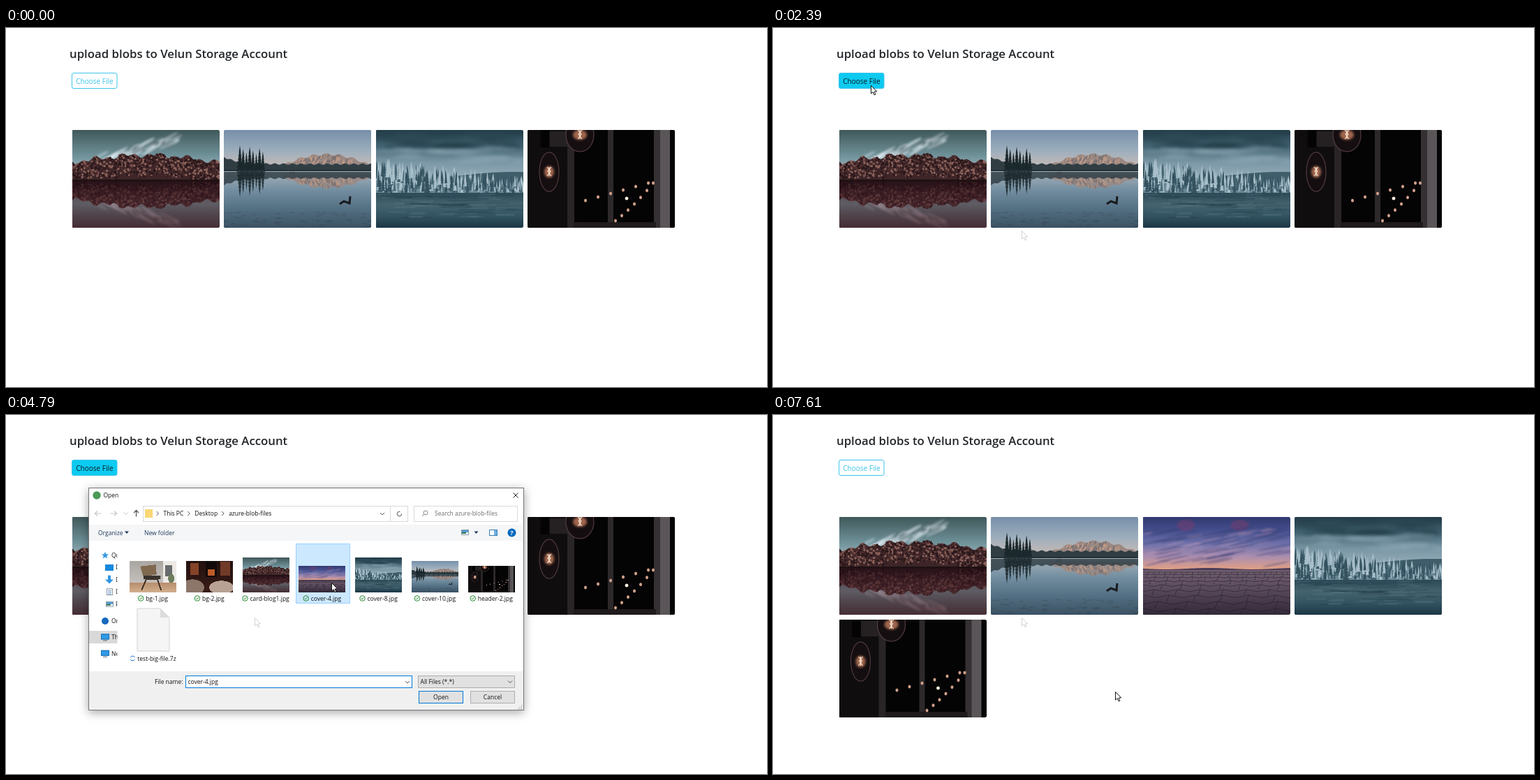
An HTML page with a canvas that plays this animation: 1090 by 514 pixels, repeating every 8 s.

```html
<!DOCTYPE html>
<html lang="en">
<head>
<meta charset="utf-8">
<title>Blob upload</title>
<style>
  html, body { margin: 0; width: 100%; height: 100%; overflow: hidden; background: #fff; }
  canvas { display: block; }
</style>
</head>
<body>
<canvas id="stage" width="1090" height="514"></canvas>
<script>
const W = 1090, H = 514, LOOP = 8000, PW = 211, PH = 140;
let c = document.getElementById('stage').getContext('2d'); // context the helpers draw on

// ---------- helpers ----------
const clamp = k => Math.max(0, Math.min(1, k));

function box(color, x, y, w, h, border, width = 1) {
  c.fillStyle = color;
  c.fillRect(x, y, w, h);
  if (!border) return;
  c.strokeStyle = border;
  c.lineWidth = width;
  c.strokeRect(x + width / 2, y + width / 2, w - width, h - width);
}
function trace(points) {
  c.beginPath();
  for (let i = 0; i < points.length; i += 2) c.lineTo(points[i], points[i + 1]);
}
function poly(color, ...points) {
  trace(points);
  c.fillStyle = color;
  c.fill();
}
function outline(color, width = 1) {
  c.strokeStyle = color;
  c.lineWidth = width;
  c.stroke();
}
function line(color, width, ...points) {
  trace(points);
  outline(color, width);
}
function oval(color, x, y, rx, ry = rx, turn = 0) {
  c.beginPath();
  c.ellipse(x, y, rx, ry, turn, 0, 7);
  c.fillStyle = color;
  c.fill();
}
function arc(color, x, y, r, from = 0, to = 7) {
  c.beginPath();
  c.arc(x, y, r, from, to);
  outline(color);
}
function text(str, x, y, { size = 8.5, color = '#111', weight = 400, align = 'left' } = {}) {
  c.font = `${weight} ${size}px "Open Sans", "Noto Sans", sans-serif`;
  c.textAlign = align;
  c.fillStyle = color;
  c.fillText(str, x, y + size * 0.36);
}
function fade(y0, y1, ...colors) {
  const g = c.createLinearGradient(0, y0, 0, y1);
  colors.forEach((color, i) => g.addColorStop(i / (colors.length - 1), color));
  box(g, 0, y0, PW, y1 - y0);
}
function scatter(n, seed, draw) {
  const random = () => (seed = (seed * 16807) % 2147483647) / 2147483647;
  for (let i = 0; i < 10; i++) random();
  for (let i = 0; i < n; i++) draw(random(), random(), random());
}
function isolated(draw) {
  c.save();
  draw();
  c.restore();
}
const blurred = (px, draw) => isolated(() => { c.filter = `blur(${px}px)`; draw(); });

// Fills from a skyline top(x) down to the base.
function ridge(color, base, top, x0 = 0, x1 = PW) {
  c.fillStyle = color;
  for (let x = x0; x < x1; x++) c.fillRect(x, top(x), 1.5, base - top(x));
}
function mirrored(y, alpha, draw) {
  isolated(() => {
    c.beginPath();
    c.rect(0, y, PW, PH - y);
    c.clip();
    c.translate(0, y * 2);
    c.scale(1, -1);
    c.globalAlpha = alpha;
    draw();
  });
}
function pine(color, x, base, h) {
  for (let i = 0; i < 6; i++) {
    const top = base - h + i * h * 0.14, half = h * (0.04 + i * 0.018);
    poly(color, x, top, x + half, top + h * 0.28, x - half, top + h * 0.28);
  }
}
const pick = (list, k) => list[Math.floor(k * list.length)];

function canvas(w, h, scale, draw) {
  const el = document.createElement('canvas'), before = c;
  el.width = w * scale;
  el.height = h * scale;
  c = el.getContext('2d');
  c.scale(scale, scale);
  draw();
  c = before;
  return el;
}

// ---------- pictures ----------
function redLake() {
  const sky = () => {
    fade(0, 72, '#40585a', '#6f9199', '#b4cad0');
    blurred(3, () => scatter(60, 11, (a, b, s) =>
      oval(s > 0.3 ? 'rgba(232,243,250,.4)' : 'rgba(58,82,86,.6)', 40 + a * 105, 36 - a * 28 + b * 14, 4 + s * 13, 2, -0.5)));
  };
  const wood = () => {
    const top = x => 47 - 11 * Math.sin(Math.PI * x / PW) + 2 * Math.sin(x / 3) + 2 * Math.sin(x / 7);
    ridge('#3d2528', 73, top);
    scatter(1100, 5, (a, b, s) =>
      oval(pick(['#6e4442', '#50302f', '#8d645c', '#2c191c'], s), a * PW, top(a * PW) + b * 29, 0.7 + s * 1.2));
  };
  sky();
  wood();
  mirrored(73, 1, sky);
  mirrored(73, 0.9, wood);
  fade(73, PH, 'rgba(30,8,16,.75)', 'rgba(72,34,42,.5)', 'rgba(70,30,38,.75)');
  box('#1f1114', 0, 71, PW, 3);
}

function calmLake() {
  const shore = () => {
    const rock = x => 52 - 17 * Math.sin(Math.PI * clamp((x - 84) / 125)) ** 0.8 + 1.5 * Math.sin(x / 3);
    ridge('#9b8882', 54, rock, 84, 209);
    scatter(90, 21, (a, b, s) => oval(pick(['#c09b87', '#7a7172'], s), 95 + a * 90, rock(95 + a * 90) + 2 + b * 10, 1, 3, 0.4));
    ridge('#303e44', 58, x => 49 - 10 * Math.exp(-x / 20) + Math.sin(x / 2));
    for (let i = 0; i < 8; i++) pine('#1b292d', 23 + i * 4.7, 60, 38 - (i * 5) % 13);
  };
  fade(0, 58, '#7790a9', '#9caebd', '#d0bfb5');
  shore();
  fade(58, PH, '#a9b4bd', '#748fa1', '#547084', '#3b5263');
  mirrored(59, 0.72, shore);
  box('#222f34', 0, 57, PW, 2);
  scatter(60, 4, (a, b, s) => oval('rgba(45,58,64,.25)', a * PW, 118 + b * 22, 2 + s * 4, 0.8));
  line('#17191c', 3, 166, 106, 172, 102, 180, 105, 181, 95);
}

function frost() {
  fade(0, 70, '#243e4a', '#446473', '#7b98a6', '#98afbb');
  blurred(5, () => scatter(40, 9, (a, b, s) =>
    oval(b > 0.5 ? 'rgba(150,177,190,.3)' : 'rgba(30,56,68,.3)', a * PW, 4 + b * 42, 10 + s * 30, 3)));
  ridge('#3f5d6a', 91, x => 67 - 7 * Math.sin((x - 105) / 60), 105);
  ridge('#698795', 91, x => 64 + x * 0.09);
  scatter(380, 17, (a, b, s) => {
    const depth = 10 + 16 * (1 - a);
    pine(pick(['#2b4856', '#93afbc', '#466673', '#355360', '#a9c0cb'], s), a * PW, 91 - depth * (1 - b), 8 + depth * s * 0.9);
  });
  pine('#36525e', 74, 91, 34);
  fade(90, PH, '#2c4a57', '#45646f', '#335361', '#1c3745');
  blurred(1, () => scatter(60, 3, (a, b, s) =>
    box(pick(['rgba(130,162,176,.2)', 'rgba(20,44,56,.25)'], s), a * 180, 91 + b * 34, 15 + s * 30, 1.5)));
}

function bulb(x, y, rx, ry) {
  oval('#150e10', x, y, rx, ry);
  outline('#5b4346');
  blurred(3, () => oval('#a0664e', x, y, rx * 0.5, ry * 0.3));
  for (let i = -1; i < 2; i++) line('#ffe9d4', 1, x + i * 3, y + 6, x - i * 2, y - 1, x + i * 3, y - 7);
}
function bulbs() {
  const bar = (color, x, w) => box(color, x, 0, w, PH);
  bar('#050405', 0, PW);
  bar('#100d0f', 0, 57);
  box('#252123', 28, 2, 30, 22);
  bar('#292527', 57, 10);
  bar('#2d292b', 115, 8);
  bar('#353133', 181, 9);
  bar('#5a5558', 190, 14);
  box('#1f1b1d', 66, 132, 118, 8);
  line('#050405', 13, 25, 0, 25, 25);
  bulb(31, 60, 14, 28);
  bulb(75, 7, 20, 24);
  const light = (x, y) => oval('#d0a08a', x, y, 2, 2.4);
  for (let i = 0; i < 7; i++) light(126 + 9 * i, 130 - 7 * i - i * i / 3);
  for (let i = 0; i < 6; i++) light(83 + 18 * i, 101 - 5 * i);
  oval('#fff0df', 142, 98, 2.4);
}

function desert() {
  fade(0, 75, '#32396f', '#454f8d', '#6d70a9', '#a98db0', '#e2a084');
  blurred(2, () => {
    [62, 139].forEach(x => oval('rgba(112,62,112,.6)', x, 12, 13, 8));
    scatter(75, 31, (a, b, s) => oval(pick(['rgba(205,160,185,.3)', 'rgba(52,58,112,.35)'], s), a * PW, 18 + b * 50, 8 + s * 18, 1.4, -0.2));
  });
  ridge('#4a3c58', 77, x => 74 + Math.sin(x / 20));
  fade(76, PH, '#71606f', '#5f4f61', '#493c4d', '#332a39');
  for (let row = 0, y = 79; y < PH; row++, y += 2 + row) {
    const pitch = 8 + row * 5;
    for (let x = -(row % 2) * pitch / 2; x < PW; x += pitch)
      line('rgba(30,22,36,.6)', 0.8, x, y, x + pitch / 2, y + row * 0.6, x + pitch, y, x + pitch * 0.9, y + 3 + row);
  }
}

function armchair() {
  fade(0, 96, '#aaa6a2', '#c3bfbb');
  fade(96, PH, '#b78e6c', '#d2af8f');
  box('#ece9e5', 150, 0, 61, 96);
  box('#686b6c', 160, 20, 32, 48);
  poly('#80694f', 48, 24, 118, 16, 122, 60, 62, 70);
  box('#37332f', 62, 66, 78, 15);
  line('#3e3027', 6, 54, 130, 76, 80, 125, 80, 142, 130);
  oval('#6c7e5d', 188, 78, 14, 20);
}
function fireside() {
  fade(0, PH, '#22100f', '#3a1d17');
  box('#854328', 20, 8, 36, 54);
  box('#120a0a', 88, 0, 52, 72);
  box('#bb5c2a', 98, 38, 32, 26);
  box('#713b28', 155, 4, 45, 62);
  oval('#8c7569', 30, 118, 52, 36);
  oval('#b7a293', 160, 118, 55, 30);
}

const picture = paint => canvas(PW, PH, 2, () => {
  c.beginPath();
  c.roundRect(0, 0, PW, PH, 2);
  c.clip();
  paint();
});
const [RED, CALM, FROST, BULBS, DESERT, CHAIR, FIRE] =
  [redLake, calmLake, frost, bulbs, desert, armchair, fireside].map(picture);

// ---------- file dialog ----------
const BLUE = '#0078d7', GRAY = '#555', PALE = '#d9d9d9', NAVY = '#1e395b';
const FILES = [
  ['bg-1.jpg', CHAIR, 45], ['bg-2.jpg', FIRE, 45], ['card-blog1.jpg', RED, 50], ['cover-4.jpg', DESERT, 38],
  ['cover-8.jpg', FROST, 50], ['cover-10.jpg', CALM, 45], ['header-2.jpg', BULBS, 38],
];

function chevron(x, y, turn = 0, color = GRAY) {
  isolated(() => {
    c.translate(x, y);
    c.rotate(turn);
    line(color, 1, -3, -1.5, 0, 1.5, 3, -1.5);
  });
}
function arrow(x, y, turn, color) {
  isolated(() => {
    c.translate(x, y);
    c.rotate(turn);
    line(color, 1.1, -4.5, 0, 4.5, 0, 1, -3.5);
    line(color, 1.1, 4.5, 0, 1, 3.5);
  });
}
const caret = (x, y) => poly(NAVY, x - 3, y - 1.5, x + 3, y - 1.5, x, y + 2);

const icons = {
  star(x, y) {
    const points = [];
    for (let i = 0; i < 10; i++) {
      const r = i % 2 ? 2.3 : 5.5, a = i * Math.PI / 5 - Math.PI / 2;
      points.push(x + r * Math.cos(a), y + r * Math.sin(a));
    }
    poly('#3297e3', ...points);
  },
  desktop: (x, y) => box('#1588dc', x - 6, y - 4, 12, 9),
  download(x, y) {
    box('#3297e3', x - 2, y - 6, 4, 7);
    poly('#3297e3', x - 6, y, x + 6, y, x, y + 6);
  },
  sheet(x, y) {
    box('#fff', x - 4, y - 5, 9, 10, '#8b98a5');
    for (let i = 0; i < 3; i++) box('#5c8fc0', x - 2, y - 2.5 + i * 2.5, 5, 1);
  },
  landscape(x, y) {
    box('#fff', x - 5, y - 4, 11, 8, '#8d9aa6');
    box('#4f9bd0', x - 4, y - 3, 9, 3);
    box('#39704f', x - 4, y, 6, 2);
  },
  disc: (x, y) => oval('#1669bd', x, y, 5),
  screen(x, y) {
    box('#2f9be8', x - 6, y - 5, 12, 8, '#1a6fb5');
    box('#56687a', x - 3, y + 4, 6, 1);
  },
};

function sidebar() {
  isolated(() => {
    c.beginPath();
    c.rect(119, 181, 40.5, 186);
    c.clip();
    box(PALE, 119, 309, 41, 18);
    const row = (icon, name, x, y) => {
      icons[icon](x, y);
      text(name, x + 9, y);
    };
    row('star', 'Quick access', 142, 201);
    ['desktop Desktop', 'download Downloads', 'sheet Documents', 'landscape Pictures']
      .forEach((entry, i) => row(...entry.split(' '), 148, 218 + i * 17.6));
    [['disc', 'One'], ['screen', 'This PC'], ['screen', 'Network']]
      .forEach((entry, i) => row(...entry, 142, 295 + i * 23.4));
  });
}

function fileLabel(name, center, y, synced) {
  c.font = '8.5px "Open Sans", "Noto Sans", sans-serif';
  const x = center - c.measureText(name).width / 2 - 1.5;
  if (synced) {
    arc('#25872f', x, y, 3.8);
    line('#25872f', 1, x - 2, y, x - 0.5, y + 1.5, x + 2, y - 1.5);
  } else {
    arc('#1f78c8', x, y, 3.4, 0.4, 2.8);
    arc('#1f78c8', x, y, 3.4, 3.6, 5.9);
  }
  text(name, x + 7, y);
}

function addressBar() {
  arrow(132, 141, Math.PI, '#c5c5c5');
  arrow(154, 141, 0, '#c5c5c5');
  chevron(171.5, 141, 0, '#c5c5c5');
  arrow(186.5, 141, -Math.PI / 2, '#444');
  box('#fff', 196, 130, 380, 23, PALE);
  box(PALE, 550, 130, 1, 23);
  box('#f9d774', 199, 135, 11, 12);
  ['This PC', 'Desktop', 'azure-blob-files'].reduce((x, name) => {
    chevron(x, 141, -Math.PI / 2);
    text(name, x + 8.5, 141);
    return x + c.measureText(name).width + 16;
  }, 217);
  chevron(539, 141.5);
  arc(GRAY, 563.5, 141.5, 3.3, 0, 5);
  box('#fff', 584, 130, 149, 23, PALE);
  arc('#888', 601, 140, 3);
  line('#888', 1, 599, 142, 596, 145);
  text('Search azure-blob-files', 614, 141, { color: '#6d6d6d' });
}

function toolbar() {
  box('#f5f6f7', 119, 157, 622, 23);
  text('Organize', 132, 168.5, { color: NAVY });
  text('New folder', 198, 168.5, { color: NAVY });
  caret(173, 168);
  icons.landscape(657, 168);
  caret(673.5, 168);
  box('#fff', 692, 164, 12, 9, '#3b7fb5');
  box('#6fb2e2', 699, 165, 4, 7);
  oval('#0069bd', 724.5, 168.5, 6);
  text('?', 724.5, 168.5, { size: 9, color: '#fff', weight: 700, align: 'center' });
}

function fileList(picked, hovered) {
  if (picked) box('#cce8ff', 415, 184, 78, 86, '#99d1ff');
  else if (hovered) box('#e5f3ff', 415, 184, 78, 86);
  FILES.forEach(([name, photo, height], i) => {
    const center = 210.5 + i * 80.8;
    c.drawImage(photo, center - 33.5, 254 - height, 67, height);
    fileLabel(name, center, 262.5, true);
  });
  poly('#f5f5f5', 188, 277, 221, 277, 234, 290, 234, 338, 188, 338, 188, 277);
  outline('#d3d3d3');
  poly('#dcdcdc', 221, 277, 234, 290, 221, 290);
  fileLabel('test-big-file.7z', 210.5, 348.5, false);
}

function footer(detail, picked) {
  const field = (x, y, w, label, fill, border, align = 'left') => {
    if (!detail) return box('#fff', x, y, w, 18);
    box(fill, x, y, w, 18, border);
    text(label, align === 'left' ? x + 3.5 : x + w / 2, y + 9, { align });
  };
  box('#f0f0f0', 118, 367, 624, 56);
  field(257, 373, 325, picked ? 'cover-4.jpg' : '', '#fff', BLUE);
  field(590, 373, 139, 'All Files (*.*)', '#e1e1e1', '#adadad');
  field(591, 395, 64, 'Open', '#e1e1e1', BLUE, 'center');
  field(665, 395, 64, 'Cancel', '#e1e1e1', '#adadad', 'center');
  if (!detail) return box('#fff', 214, 377, 40, 11);
  text('File name:', 253.5, 382, { align: 'right' });
  chevron(575, 382.5);
  chevron(722, 382);
  for (let i = 0; i < 3; i++) for (let j = 0; j <= i; j++) box('#a5a5a5', 738 - j * 2.5, 415 + i * 2.5, 1.3, 1.3);
}

function dialog({ detail, picked, hovered }) {
  isolated(() => {
    c.shadowColor = 'rgba(0,0,0,.36)';
    c.shadowBlur = 13;
    c.shadowOffsetY = 3;
    box('#fff', 118, 104, 624, 319);
  });
  oval(detail ? '#4a9a55' : '#777', 130, 115, 5.7);
  text('Open', 139.5, 115);
  line('#222', 1, 726.5, 111.5, 733.5, 118.5);
  line('#222', 1, 733.5, 111.5, 726.5, 118.5);
  if (detail) {
    addressBar();
    toolbar();
    sidebar();
    fileList(picked, hovered);
  }
  footer(detail, picked);
  c.strokeStyle = '#777';
  c.strokeRect(118.5, 104.5, 623, 318);
}
const layer = state => canvas(W, H, 1, () => dialog(state));
const LAYERS = {
  blank: layer({}),
  ready: layer({ detail: true }),
  hovered: layer({ detail: true, hovered: true }),
  picked: layer({ detail: true, picked: true }),
};

// ---------- timeline ----------
const TICK = 68;
const ticks = ms => Math.floor(ms / TICK + 0.15) * TICK;
const GLIDES = [
  { from: 200, to: 680, x: 356, y: 290 },
  { from: 680, to: 960, x: 198, y: 172 },
  { from: 960, to: 1170, x: 170, y: 138 },
  { from: 1170, to: 1640, x: 137, y: 84 },
  { from: 2390, to: 2390, x: 140, y: 82 },
  { from: 3860, to: 4320, x: 466, y: 240 },
  { from: 4870, to: 5350, x: 490, y: 396 },
];
function pointer(t) {
  let x = 944, y = 492;
  for (const glide of GLIDES) {
    if (t < glide.from) break;
    const k = t >= glide.to ? 1 : clamp(ticks(t - glide.from) / (glide.to - glide.from));
    x += (glide.x - x) * k;
    y += (glide.y - y) * k;
  }
  return { x, y };
}
function dialogOpacity(t) {
  const opened = 1 - (1 - clamp(ticks(t - 3400) / 200)) ** 3;
  return Math.min(opened, 1 - clamp(ticks(t - 4792) / (3 * TICK)));
}

function drawPointer({ x, y }, edge) {
  isolated(() => {
    c.translate(x + 0.5, y + 0.5);
    poly('#fff', 0, 0, 0, 11.5, 2.7, 9.1, 4.6, 13.4, 6.4, 12.6, 4.6, 8.5, 8.2, 8.4);
    c.closePath();
    outline(edge);
  });
}

function drawButton(t) {
  const hover = t < 5060 ? clamp((t - 1440) / 150) : 0;
  c.beginPath();
  c.roundRect(94.5, 64.5, 64.5, 22, 2.5);
  c.fillStyle = `rgba(13,202,240,${hover})`;
  c.fill();
  outline('#3dc4ea');
  text('Choose File', 100.3, 76, { size: 10, color: hover > 0.5 ? '#071c22' : '#3dc4ea' });
}

function drawDialog(t, at) {
  const alpha = dialogOpacity(t), scale = 0.95 + 0.05 * alpha;
  if (!alpha) return;
  const over = at.x > 415 && at.y > 184;
  const state = t < 3600 ? 'blank' : t >= 4460 ? 'picked' : over ? 'hovered' : 'ready';
  isolated(() => {
    c.globalAlpha = alpha;
    c.translate(430, 263.5);
    c.scale(scale, scale);
    c.drawImage(LAYERS[state], -430, -263.5);
  });
}

function render(t) {
  const at = pointer(t);
  box('#fff', 0, 0, W, H);
  text('upload blobs to Velun Storage Account', 91, 36.5, { size: 16.8, color: '#212529', weight: 600 });
  drawButton(t);
  const photos = t < 7480 ? [RED, CALM, FROST, BULBS] : [RED, CALM, DESERT, FROST, BULBS];
  photos.forEach((photo, i) => c.drawImage(photo, 94.5 + (i % 4) * 217.5, 146 + Math.floor(i / 4) * 147, PW, PH));
  drawDialog(t, at);
  if (t >= 750) drawPointer({ x: 356, y: 290 }, '#d2d2d2'); // faint trail left behind
  if (t >= 200) drawPointer(at, '#111');
}

const begin = performance.now();
function tick() {
  render((performance.now() - begin) % LOOP);
  requestAnimationFrame(tick);
}
tick();
</script>
</body>
</html>
```
